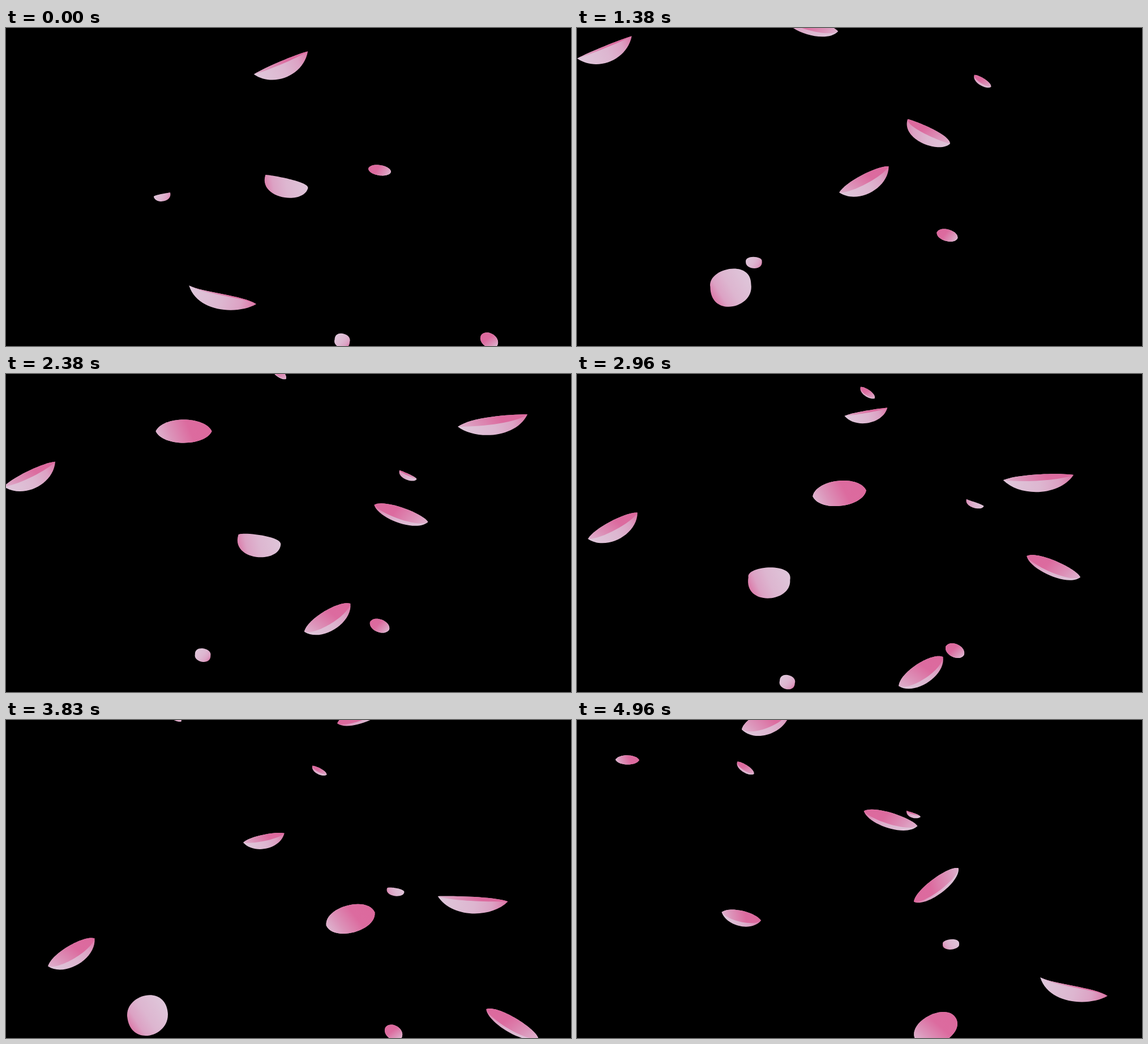
Recreate the animation shown at these times as an HTML page with a canvas. Size 998 px wide and 561 px high, loop 5000 ms.

```html
<!DOCTYPE html>
<html lang="en">
<head>
<meta charset="utf-8">
<title>Falling petals</title>
<style>
  html, body { margin: 0; width: 100%; height: 100%; overflow: hidden; background: #000; }
  canvas { display: block; }
</style>
</head>
<body>
<canvas id="stage" width="998" height="561"></canvas>
<script>
const ctx = document.getElementById('stage').getContext('2d');
const W = 998, H = 561, LOOP = 5000, FPS = 24, RAD = Math.PI / 180;
const INNER = [[0, '#dc699d'], [0.4, '#dc6b9f'], [0.72, '#dc93b9'], [1, '#dfbdd5']];
const OUTER = [[0, '#dc74a5'], [0.22, '#dca2c4'], [0.48, '#ddb6d0'], [1, '#dfc8db']];

// Each petal is a shallow cup that falls while it rolls about its long axis.
// Lists are Bezier control values over the petal's span in ms:
// one value stays, two change evenly, three or four curve.
//   turn: angle of the long axis, roll: 0 = edge-on, positive shows the inside,
//   bend: S-curve of the edges, round: 0.2 = pointed ends, 0 = blunt,
//   dark: side of the pink end, shade: slant of the outer shading.
// copies: further falls of the same petal as [delay, x shift].
const base = { copies: [], bend: [0], round: [0.12], dark: 'right', shade: 0 };
const petals = [
  {
    span: [0, 2960], copies: [[1580, -444]],
    x: [485.5, 459.5, 542, 607.5], y: [61.5, 196, 366, 525],
    turn: [-23, -33.5], roll: [7, 41], size: [103.5, 93.5], width: 21.6, depth: [27],
    round: [0.22, 0.14]
  },
  {
    span: [670, 3830], copies: [[-2160, 6]], dark: 'left', shade: 0.25,
    x: [663, 684, 271, 250], y: [63, 288, 265, 519],
    turn: [37, 32, 0, -6], roll: [22, -2, -58], size: [96, 72, 72], width: 40, depth: [21, 24, 48],
    bend: [6], round: [0.13, 0.13, -0.22, 0]
  },
  {
    span: [0, 3830], copies: [[-3830, 169]], dark: 'left',
    x: [660, 640, 684.5], y: [251, 416, 551],
    turn: [8.5, 17, 32], roll: [40, 62], size: [40.5, 34], width: 14, depth: [3],
    round: [0.06]
  },
  {
    span: [0, 2960], copies: [[-3060, 218]], shade: 0.35,
    x: [275.5, 308, 371.5], y: [294, 423, 543.5],
    turn: [-15, -1, 8], roll: [-4, -38, -51], size: [30, 27], width: 16, depth: [12],
    bend: [-2], round: [0, -0.1]
  },
  {
    span: [2380, 5630], copies: [[-4960, -495]],
    x: [859, 724, 917, 878.5], y: [83, 281, 410, 563],
    turn: [-10, 22], roll: [18, -1], size: [125, 123], width: 22, depth: [26],
    bend: [-4, 10], round: [0.22]
  },
  {
    span: [1380, 3830], copies: [[2960, -33]], dark: 'left',
    x: [415.5, 612, 980, 894.5], y: [-3, 299, 280, 534.5],
    turn: [13, 17, 29], roll: [40, 48], size: [96, 105], width: 15, depth: [21],
    bend: [-2], round: [0.15, 0.12]
  },
  {
    span: [2380, 4960],
    x: [315.5, 564, 691, 633.5], y: [102, 280, 372, 545.5],
    turn: [0, -27], roll: [47, 70], size: [99, 81], width: 28, depth: [4],
    round: [0.13, 0]
  },
  {
    span: [670, 4960], copies: [[3690, -419]], dark: 'left', shade: 0.3,
    x: [716.5, 722, 660.5], y: [34, 395.5],
    turn: [40, 28, 0], roll: [35, 8, -51], size: [37.5, 29], width: 11, depth: [8, 11],
    bend: [2], round: [0.12, -0.08]
  },
  {
    span: [2960, 4960], dark: 'left', shade: 0.2,
    x: [513.5, 564, 594.5], y: [33, 95, 165.5],
    turn: [39, 24], roll: [31, 8], size: [32, 27], width: 10, depth: [7.3],
    bend: [2]
  },
  {
    span: [2380, 4960],
    x: [505, 540, 451, 290], y: [-21, 99, 279, 346.5],
    turn: [-9, -9, -27, 12], roll: [-2, 38], size: [79, 71], width: 16, depth: [20],
    bend: [-1], round: [0.18]
  },
  {
    span: [4200, 4960],
    x: [67.5, 89], y: [9.5, 70.5],
    turn: [1], roll: [43], size: [42], width: 12, depth: [2],
    round: [0.14]
  },
  {
    span: [4760, 4960],
    x: [332.5, 333.5], y: [-36.5, -0.5],
    turn: [-22.5], roll: [42], size: [92], width: 22, depth: [32],
    round: [0.15]
  },
  {
    span: [3830, 4960], dark: 'left',
    x: [632.5, 634.5], y: [-14, 291.5],
    turn: [-22, -37], roll: [45], size: [102, 98.5], width: 16, depth: [20]
  }
].map(p => ({ ...base, ...p }));

// Bezier value at s; also runs on smoothly beyond 0..1.
function along(list, s) {
  let v = list;
  while (v.length > 1) v = v.slice(1).map((b, i) => v[i] + (b - v[i]) * s);
  return v[0];
}

function paint(len, dark, slant, stops) {
  const end = dark === 'right' ? len / 2 : -len / 2, drop = slant * len;
  const g = ctx.createLinearGradient(end, drop, -end, -drop);
  for (const [at, color] of stops) g.addColorStop(at, color);
  return g;
}

// Closed shape between two edges that bulge by top and bottom at mid-length.
function blade(len, round, bend, top, bottom, fill) {
  const tip = len / 2, ctl = tip - len * round;
  const up = top / 0.75, down = bottom / 0.75;
  ctx.beginPath();
  ctx.moveTo(-tip, 0);
  ctx.bezierCurveTo(-ctl, up + bend, ctl, up - bend, tip, 0);
  ctx.bezierCurveTo(ctl, down - bend, -ctl, down + bend, -tip, 0);
  ctx.fillStyle = fill;
  ctx.fill();
}

function drawPetal(p, t, dx) {
  const [from, to] = p.span, s = (t - from) / (to - from);
  const y = along(p.y, s);
  if (y < -70 || y > H + 70) return;
  const len = along(p.size, s), round = along(p.round, s), bend = along(p.bend, s);
  const roll = along(p.roll, s) * RAD;
  // Rim and belly of the cup as seen at this roll.
  const rim = p.width * Math.sin(roll), half = Math.abs(rim);
  const sag = along(p.depth, s) * Math.cos(roll);
  const belly = half > 2 * sag ? half : sag + half * half / (4 * sag);
  ctx.save();
  ctx.translate(along(p.x, s) + dx, y);
  ctx.rotate(along(p.turn, s) * RAD);
  blade(len, round, bend, -half, belly, paint(len, p.dark, p.shade, OUTER));
  if (rim > 0) blade(len, round, bend, -rim, rim, paint(len, p.dark, -0.2, INNER));
  ctx.restore();
}

function draw(t) {
  ctx.fillStyle = '#000';
  ctx.fillRect(0, 0, W, H);
  for (const p of petals) {
    for (const [delay, dx] of [[0, 0], ...p.copies]) drawPetal(p, t - delay, dx);
  }
}

const start = performance.now();
function tick() {
  const t = (performance.now() - start) % LOOP;
  const frame = Math.floor((t + 5) * FPS / 1000) % (LOOP * FPS / 1000);
  draw(frame * 1000 / FPS);
  requestAnimationFrame(tick);
}
tick();
</script>
</body>
</html>
```
